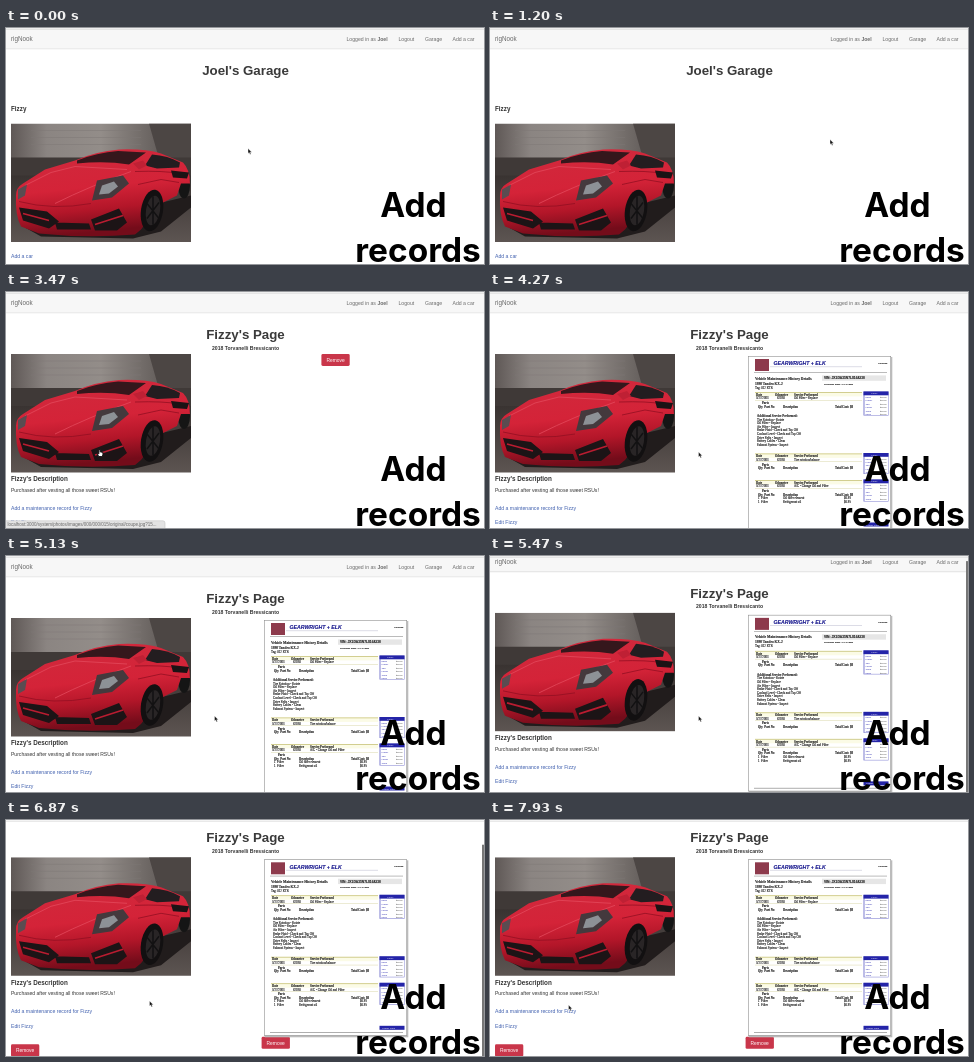
Write an HTML page that moves like this. It is 478 px wide and 236 px high and loops after 8000 ms.

```html
<!DOCTYPE html>
<html lang="en">
<head>
<meta charset="utf-8">
<title>Add records</title>
<style>
  html, body { margin: 0; width: 100%; height: 100%; overflow: hidden; background: #fff; }
  svg { display: block; width: 100vw; height: 100vh; }
  text { font-family: "Liberation Sans", sans-serif; font-size: 5.15px; fill: #333; white-space: pre; }
  .bold { font-weight: 700; }
  .nav text { fill: #6a6a6a; }
  .title { font-size: 13.3px; font-weight: 700; fill: #3a3a3a; text-anchor: middle; }
  .link { fill: #3f5fae; }
  .head { font-size: 6.3px; font-weight: 700; }
  .white { fill: #fff; font-size: 4.9px; text-anchor: middle; }
  .record text { font-family: "Liberation Serif", serif; font-size: 3.1px; fill: #222; stroke: #222; stroke-width: .12; }
  .caption text { font: 700 33.4px Inter, sans-serif; fill: #000; text-anchor: middle; }
</style>
</head>
<body>
<svg viewBox="0 0 478 236" preserveAspectRatio="none">
  <defs>
    <linearGradient id="wall" x2="1">
      <stop offset="0" stop-color="#5f5856"/><stop offset=".2" stop-color="#8b8582"/>
      <stop offset=".5" stop-color="#938d89"/><stop offset="1" stop-color="#4b4543"/>
    </linearGradient>
    <linearGradient id="ground" x2="0" y2="1">
      <stop offset="0" stop-color="#393331"/><stop offset="1" stop-color="#5d5552"/>
    </linearGradient>
    <linearGradient id="paint" x2=".2" y2="1">
      <stop offset="0" stop-color="#d02a3d"/><stop offset=".5" stop-color="#d42338"/>
      <stop offset=".75" stop-color="#b31629"/><stop offset="1" stop-color="#740c1a"/>
    </linearGradient>
    <clipPath id="frame"><path d="M0 0H180V118.5H0z"/></clipPath>
    <g id="car" clip-path="url(#frame)">
      <path fill="url(#wall)" d="M0 0H180V50H0z"/>
      <path stroke="#7d7774" stroke-width=".5" d="M20 7H130M20 14H130M20 21H130"/>
      <path fill="#4c4644" d="M138 0H180V42H150z"/>
      <path fill="#3f3937" d="M0 34H180V60H0z"/>
      <path fill="url(#ground)" d="M0 52H180V119H0z"/>
      <path fill="#211c1c" d="M14 104L30 113 122 115 150 108 180 84V72L130 84z"/>
      <ellipse cx="173" cy="62" rx="6" ry="13" fill="#151515"/>
      <path fill="url(#paint)" d="M5 72Q5 64 12 60L34 46 64 37Q84 28 108 26Q134 25 150 30L172 39Q179 46 179 60L170 60 166 72 150 80 130 106 124 111Q76 115 28 110L10 103Q4 92 5 72z"/>
      <path fill="#35171c" d="M66 37Q86 29 107 27.5L135 29 118 41Q94 37 66 40z"/>
      <path fill="#231d20" d="M141 31Q157 32 169 39L168 44 146 45 134 42z"/>
      <path fill="none" stroke="#e4495c" stroke-width=".8" d="M14 62L40 49 64 43 116 46M44 80Q78 63 120 48"/>
      <path fill="none" stroke="#931022" stroke-width=".8" d="M8 78Q42 87 80 80M124 48Q152 47 168 50M127 61L150 56 168 59"/>
      <path fill="#bf2034" d="M122 40L132 37 136 42 128 46z"/>
      <path fill="#44393d" d="M81 77L86 57 112 52 118 60 101 74z"/>
      <path fill="#8d9196" d="M88 71L91 62 103 58 107 63 98 70z"/>
      <path fill="#5a4c51" d="M7 66L16 61 14 72 7 76z"/>
      <path fill="#1c1416" d="M8 84L36 88 48 98 38 105 12 97zM80 96L108 85 116 99 106 107 84 107zM44 99L78 100 80 106 46 106z"/>
      <path fill="none" stroke="#b91c30" stroke-width="1.6" d="M12 90L38 97M84 101L112 92"/>
      <ellipse cx="141" cy="87" rx="11" ry="21" fill="#121011" transform="rotate(9 141 87)"/>
      <ellipse cx="142" cy="87" rx="7" ry="15" fill="#292526" transform="rotate(9 142 87)"/>
      <path stroke="#121112" stroke-width="1.5" d="M142 73V101M136 80L148 95M136 95L148 79"/>
      <path fill="#1b1315" d="M160 47L178 49 176 55 162 54z"/>
    </g>
  </defs>

  <g id="page">
    <g class="nav">
      <path fill="#f7f7f7" d="M0 0H478V21H0z"/>
      <path fill="#e2e2e2" d="M0 20.5H478V21.3H0z"/>
      <text x="5" y="13" style="font-size:6.3px">rigNook</text>
      <text x="340.5" y="13">Logged in as <tspan class="bold">Joel</tspan></text>
      <text x="392.5" y="13">Logout</text>
      <text x="419" y="13">Garage</text>
      <text x="446.5" y="13">Add a car</text>
    </g>
    <g id="garage">
      <text class="title" x="239.5" y="47">Joel's Garage</text>
      <text class="head" x="5" y="83.3">Fizzy</text>
      <use href="#car" x="5" y="95.5"/>
      <text class="link" x="5" y="230">Add a car</text>
    </g>
    <g id="details">
      <text class="title" x="239.5" y="47">Fizzy's Page</text>
      <text class="bold" x="239.5" y="57.5" text-anchor="middle" style="font-size:5.1px">2018 Torvanelli Bressicanto</text>
      <use href="#car" x="5" y="62"/>
      <text class="head" x="5" y="189.3">Fizzy's Description</text>
      <text x="5" y="200" style="font-size:5.05px">Purchased after vesting all those sweet RSUs!</text>
      <text class="link" x="5" y="218">Add a maintenance record for Fizzy</text>
      <text class="link" x="5" y="232.3">Edit Fizzy</text>
      <g class="remove" transform="translate(5 249)"></g>
      <g class="remove" id="recordRemove"></g>
      <g class="record" id="record" transform="translate(258 64)"></g>
    </g>
  </g>
  <path fill="#d4d4d4" d="M0 .8H478V1.6H0z"/>
  <g id="scrollbar"><rect x="476" width="2" height="236" fill="#777"/></g>
  <g id="status">
    <path fill="#e3e3e3" stroke="#c4c4c4" stroke-width=".6" d="M-1 228.8H157Q159 228.8 159 231V237H-1z"/>
    <text x="1.5" y="234.3" style="font-size:4.5px;fill:#666">localhost:3000/system/photos/images/000/000/015/original/coupe.jpg?15...</text>
  </g>
  <g id="cursor">
    <path id="arrow" fill="#111" stroke="#fff" stroke-width=".4" d="M0 0V5L1.2 4 2 6 3 5.6 2.2 3.7H3.8z"/>
    <path id="hand" fill="#fff" stroke="#111" stroke-width=".9" d="M-.6 0H.6V2.3L3.4 3V5.5L2.4 7H-.6L-2.6 4 -.6 4.4z"/>
  </g>
  <g class="caption">
    <text x="407.5" y="189">Add</text>
    <text x="412" y="234">records</text>
  </g>
</svg>
<script>
const $ = id => document.getElementById(id);
const LOOP = 8000, PAGE_OPENS = 2900, RECORD_LOADS = 3800;
const SCROLL_STARTS = 5150, SCROLLBAR_HIDES = 7100;

// Each key is [time, ...values].
const cursorKeys = [
  [0, 242, 120.5], [70, 242, 120.5], [800, 296, 124], [1300, 345, 110], [1700, 322, 136],
  [2000, 322, 136], [2380, 146, 183], [2420, 146, 183], [2650, 93.5, 157.5], [3530, 93.5, 157.5],
  [4200, 208.5, 160], [6100, 208.5, 160], [6870, 143.5, 181], [7870, 78.5, 185], [8000, 78.5, 185]
];
const scrollKeys = [[0, 0], [SCROLL_STARTS, 0], [6070, 18.3], [6450, 24.7], [8000, 24.7]];

function sample(keys, time) {
  const i = Math.max(1, keys.findIndex(key => key[0] > time));
  const [a, b] = [keys[i - 1], keys[i]];
  const p = (time - a[0]) / (b[0] - a[0]);
  const eased = p * p * (3 - 2 * p);
  return a.slice(1).map((v, k) => v + (b[k + 1] - v) * eased);
}

const rect = (x, y, w, h, fill) => `<rect x="${x}" y="${y}" width="${w}" height="${h}" fill="${fill}"/>`;
const label = (x, y, text, style = "") => `<text x="${x}" y="${y}" style="${style}">${text}</text>`;
const plain = fill => `fill:${fill};stroke:none;font-size:2.8px`;

function entry(y, job, height) {
  const bold = "font-weight:700;font-size:3px";
  let out = rect(7, y, 107, 4.4, "#fbfbe6") + rect(7, y, 107, .8, "#c9c47b") + rect(7, y + 8, 107, .5, "#d9d6a8");
  [[8, "Date"], [27, "Odometer"], [46, "Service Performed"]].forEach(([x, s]) => out += label(x, y + 3.7, s, bold));
  out += label(8, y + 7.3, "3/27/2003") + label(29, y + 7.3, "62038") + label(46, y + 7.3, job);
  out += label(14, y + 12, "Parts", bold) + label(10, y + 15.5, "Qty  Part No", bold)
       + label(35, y + 15.5, "Description", bold) + label(87, y + 15.5, "Total Cost: $0", bold);
  out += rect(115.5, y - .5, 25, height, "#7c7cd0") + rect(116.5, y, 23.6, height - 1, "#fff")
       + rect(115.5, y - .5, 25, 3.8, "#2424a8") + label(123, y + 2.4, "Costs", plain("#fff"));
  for (let k = 0; k < (height - 5) / 3.4; k++)
    out += label(117.5, y + 6 + k * 3.4, ["Parts", "Labor", "Tax", "Other", "Total"][k % 5], plain("#22a"))
         + label(132, y + 6 + k * 3.4, "$0.00", plain("#222"));
  return out;
}

const notes = ["Additional Service Performed:", "Tire Rotation - Rotate", "Oil Filter - Replace", "Air Filter - Inspect",
  "Brake Fluid - Check and Top Off", "Coolant Level - Check and Top Off", "Drive Belts - Inspect", "Battery Cables - Clean",
  "Exhaust System - Inspect"];

$("record").innerHTML =
  rect(.8, 1, 143.5, 177, "#bbb") + rect(0, 0, 143, 176.5, "#8f8f8f") + rect(.6, .6, 141.8, 175.3, "#fff")
  + rect(7, 3, 14, 12, "#8d3a4c")
  + label(25.5, 9.4, "GEARWRIGHT + ELK", "font:italic 700 5.2px 'Liberation Sans',sans-serif;fill:#1c1c90;stroke:#1c1c90")
  + rect(22, 10.6, 92, .5, "#b9b9cc") + label(130, 8, "4/6/2003", "font-size:2.6px")
  + rect(6, 16.5, 133, .5, "#777")
  + label(7, 23.5, "Vehicle Maintenance History Details", "font-weight:700;font-size:3.65px")
  + label(7, 28.5, "1990 Tandro KX-2", "font-weight:700;font-size:3.5px")
  + label(7, 32.5, "Tag: 812 KTR")
  + rect(74, 19.4, 64, 5.4, "#e6e6e6")
  + label(76, 23.3, "VIN: JX1DA35N7L0164238", "font:700 3.3px 'Liberation Sans',sans-serif")
  + label(76, 28.5, "Purchase Date: 7/14/1998", "font-size:2.8px")
  + entry(36, "Oil Filter - Replace", 24)
  + notes.map((s, k) => label(9, 61 + k * 3.6, s, k ? "" : "font-weight:700")).join("")
  + entry(97.5, "Tire rotation/balance", 21)
  + entry(124, "A/C - Change Oil and Filter", 22)
  + [143, 147].map((y, k) => label(10, y, "1  Filter") + label(35, y, ["Oil filter element", "Refrigerant oil"][k])
      + label(96, y, "$6.95")).join("")
  + rect(115.5, 166.5, 25, 4, "#2424a8") + label(118, 169.6, "Grand Total", plain("#fff"))
  + rect(6, 173, 133, .6, "#777");

document.querySelectorAll(".remove").forEach(button => button.innerHTML =
  `<rect width="28.3" height="12" rx="1.4" fill="#c9364a"/><text class="white" x="14.1" y="7.8">Remove</text>`);

const show = (id, visible) => $(id).setAttribute("visibility", visible ? "inherit" : "hidden");
const move = (id, x, y) => $(id).setAttribute("transform", `translate(${x} ${y})`);

function draw(now) {
  const time = now % LOOP;
  const onDetails = time >= PAGE_OPENS, loaded = time >= RECORD_LOADS;
  const pointing = time > 2420 && time < 3620;
  const [scroll] = sample(scrollKeys, time);
  show("garage", !onDetails);
  show("details", onDetails);
  show("record", onDetails && loaded);
  show("status", onDetails && time < 3620);
  show("scrollbar", time > SCROLL_STARTS && time < SCROLLBAR_HIDES);
  show("hand", pointing);
  show("arrow", !pointing);
  if (loaded) move("recordRemove", 255.6, 241.5);
  else move("recordRemove", 315.4, 62);
  move("page", 0, -scroll);
  move("scrollbar", 0, scroll);
  move("cursor", ...sample(cursorKeys, time));
  requestAnimationFrame(draw);
}
requestAnimationFrame(draw);
</script>
</body>
</html>
```
